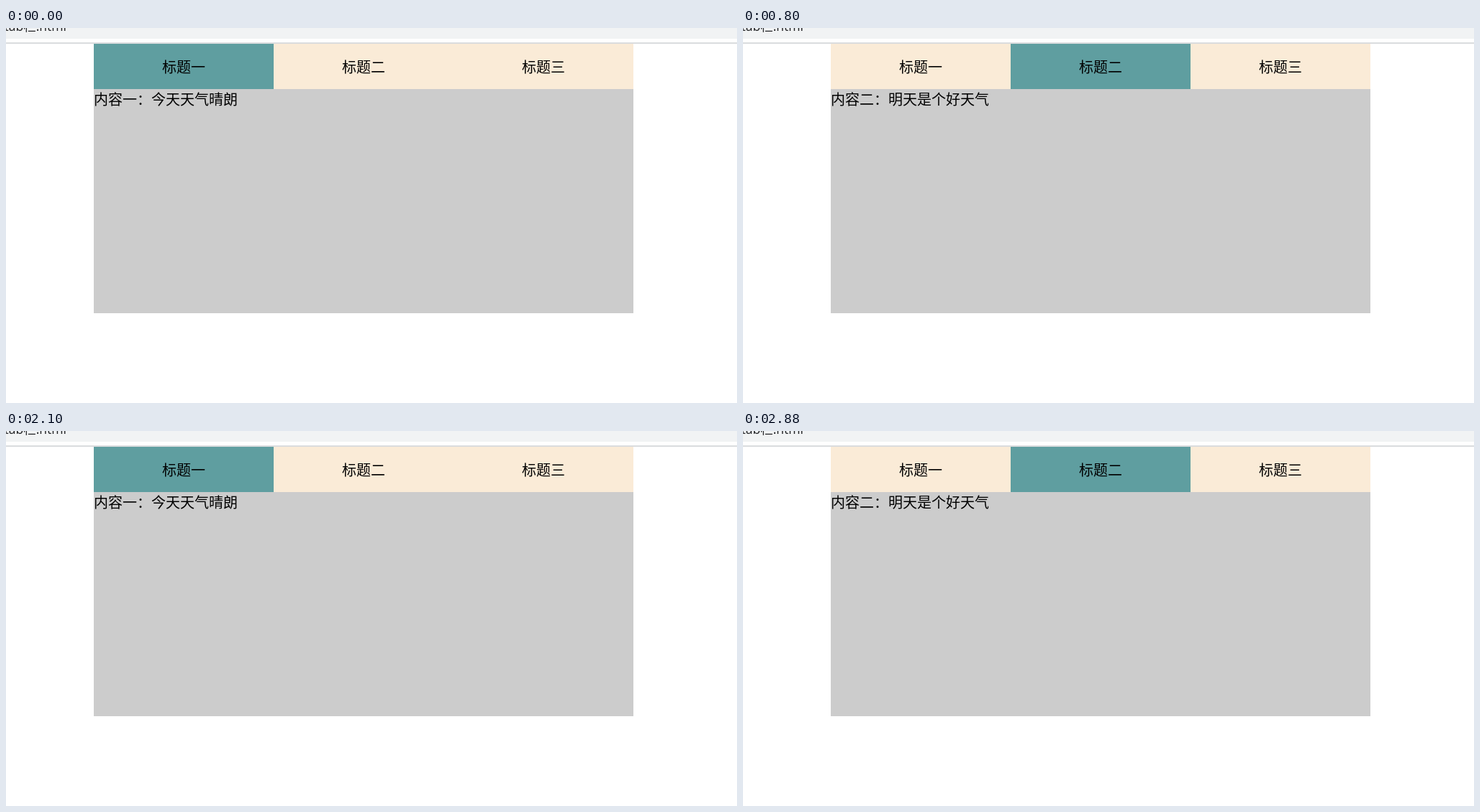
Write an HTML page that moves like this. It is 1016 px wide and 522 px high and loops after 3200 ms.

```html
<!DOCTYPE html>
<html lang="zh-CN">
<head>
<meta charset="utf-8">
<title>tab栏</title>
<style>
html, body { margin: 0; width: 100%; height: 100%; overflow: hidden; background: #fff; }
svg { display: block; width: 1016px; height: 522px; }
text { font: 20px "Noto Sans CJK SC", "Noto Sans CJK", sans-serif; }
.file { font: 17.5px "Open Sans", "Noto Sans CJK SC", sans-serif; fill: #202124; }
.tab rect { fill: antiquewhite; }
.tab.on rect { fill: cadetblue; }
</style>
</head>
<body>
<svg viewBox="0 0 1016 522">
  <rect width="1016" height="15" fill="#f1f3f4"/>
  <text class="file" x="-2.5" y="4">tab栏.html</text>
  <rect y="20" width="1016" height="2" fill="#dadcde"/>
  <g class="tab"><rect x="122" y="22" width="250" height="63"/><text x="217" y="62">标题一</text></g>
  <g class="tab"><rect x="372" y="22" width="250" height="63"/><text x="467" y="62">标题二</text></g>
  <g class="tab"><rect x="622" y="22" width="250" height="63"/><text x="717" y="62">标题三</text></g>
  <rect x="122" y="85" width="750" height="312" fill="#ccc"/>
  <text id="content" x="122" y="107"></text>
</svg>
<script>
const LOOP = 3200;
const contents = ['内容一：今天天气晴朗', '内容二：明天是个好天气', '内容三：后天可以休息啦'];
// [start in ms, selected tab]
const steps = [[0, 0], [800, 1], [1400, 2], [2100, 0], [2400, 1]];
const tabs = document.querySelectorAll('.tab');
const content = document.getElementById('content');
const start = performance.now();
let current = -1;

function select(index) {
  if (index === current) return;
  current = index;
  tabs.forEach((tab, i) => tab.classList.toggle('on', i === index));
  content.textContent = contents[index];
}

function draw() {
  const t = (performance.now() - start) % LOOP;
  select(steps.findLast(([at]) => at <= t)[1]);
  requestAnimationFrame(draw);
}
draw();
</script>
</body>
</html>
```
